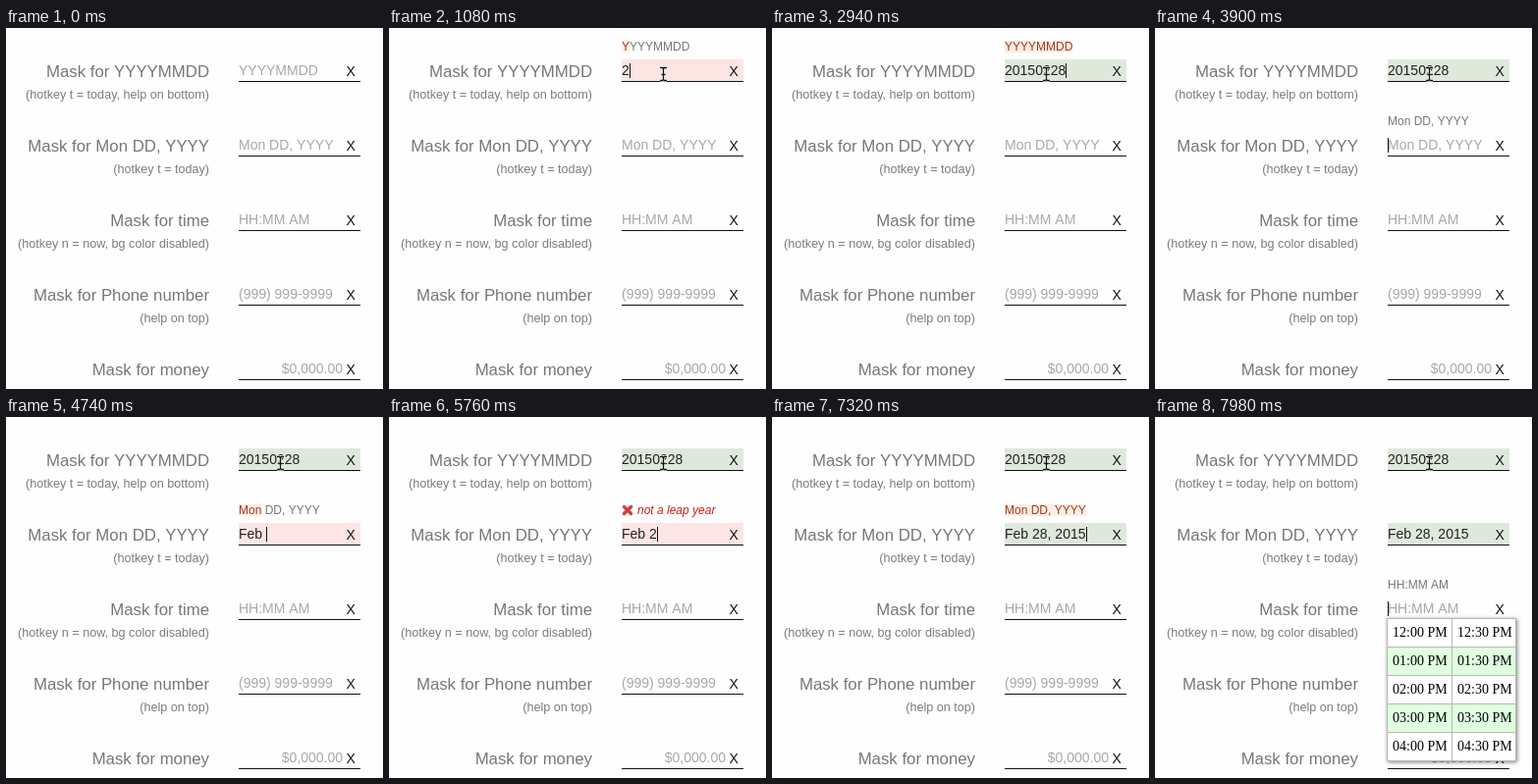
Recreate the animation shown at these times as an HTML page with a canvas. Size 384 by 368 pixels, loop 8 s.

```html
<!DOCTYPE html>
<html>
<head>
<meta charset="utf-8">
<style>
html, body { margin: 0; width: 100%; height: 100%; overflow: hidden; background: #fff; }
canvas { display: block; }
</style>
</head>
<body>
<canvas id="stage" width="384" height="368"></canvas>
<script>
const ctx = document.getElementById('stage').getContext('2d');
const LOOP = 8000, LEFT = 237, PITCH = 76;
const SANS = '"Liberation Sans", Arial, sans-serif';
const SERIF = '"Liberation Serif", "Times New Roman", serif';
const PINK = '#fce5e3', GREEN = '#dfe9db';

const rows = [
  { label: 'Mask for YYYYMMDD', note: '(hotkey t = today, help on bottom)', mask: 'YYYYMMDD' },
  { label: 'Mask for Mon DD, YYYY', note: '(hotkey t = today)', mask: 'Mon DD, YYYY' },
  { label: 'Mask for time', note: '(hotkey n = now, bg color disabled)', mask: 'HH:MM AM' },
  { label: 'Mask for Phone number', note: '(help on top)', mask: '(999) 999-9999' },
  { label: 'Mask for money', note: '', mask: '$0,000.00', right: true }
];

// Each step: start time, focused row, its value, optional error
const steps = [
  [0, -1, ''],
  [120, 0, ''], [1080, 0, '2'], [1260, 0, '20'], [1440, 0, '201'], [1620, 0, '2015'],
  [1800, 0, '20150'], [1920, 0, '201502'], [2580, 0, '2015022'], [2760, 0, '20150228'],
  [3420, 1, ''], [4200, 1, 'F'], [4440, 1, 'Fe'], [4680, 1, 'Feb '], [5040, 1, 'Feb 2'],
  [5760, 1, 'Feb 2', 'not a leap year'],
  [6600, 1, 'Feb 28, '], [6780, 1, 'Feb 28, 2'], [6960, 1, 'Feb 28, 20'],
  [7140, 1, 'Feb 28, 201'], [7320, 1, 'Feb 28, 2015'],
  [7440, 2, '']
];

function rect(x, y, w, h, color) {
  ctx.fillStyle = color;
  ctx.fillRect(x, y, w, h);
}

function text(str, x, y, size, color, align = 'left', family = SANS, style = '') {
  ctx.font = `${style} ${size}px ${family}`;
  ctx.textAlign = align;
  ctx.fillStyle = color;
  ctx.fillText(str, x, y);
  return ctx.measureText(str).width;
}

function stroke(path, width, color) {
  ctx.lineWidth = width;
  ctx.strokeStyle = color;
  ctx.stroke(new Path2D(path));
}

function drawHelp(mask, value, error, y) {
  if (error) {
    ctx.lineCap = 'round';
    const cross = `M239.5 ${y - 3.5}l7 7m0-7l-7 7`;
    stroke(cross, 4, '#e08a88');
    stroke(cross, 2.6, '#cf3a3c');
    ctx.lineCap = 'butt';
    text(error, 253, y + 4, 12, '#d01c1c', 'left', SANS, 'italic');
    return;
  }
  const done = mask.slice(0, value.trimEnd().length);
  ctx.font = `12px ${SANS}`;
  const width = ctx.measureText(done).width;
  if (done) rect(LEFT, y - 6, width, 12, '#fdeee3');
  text(done, LEFT, y + 4, 12, '#a03a20');
  text(mask.slice(done.length), LEFT + width, y + 4, 12, '#777');
}

function drawRow(row, i, [, focus, typed, error]) {
  const y = i * PITCH, focused = i === focus;
  const value = focused ? typed : i < focus ? (i ? 'Feb 28, 2015' : '20150228') : '';
  text(row.label, 207, y + 50, 16.8, '#777', 'right');
  text(row.note, 207, y + 72, 12.6, '#7c7c7c', 'right');
  if (value) rect(LEFT, y + 32, 124, 22, value.length === row.mask.length ? GREEN : PINK);
  rect(LEFT, y + 54, 124, 1, '#111');
  const width = text(value || row.mask, row.right ? 343 : LEFT, y + 48, 14,
    value ? '#222' : '#a8a8a8', row.right ? 'right' : 'left');
  text('X', 346.5, y + 49, 14, '#111');
  if (focused) {
    drawHelp(row.mask, value, error, y + 19);
    rect(LEFT + Math.round(value ? width : 0), y + 36, 1, 15, '#111');
  }
}

function drawTimes() {
  ctx.shadowColor = 'rgba(0,0,0,.5)';
  ctx.shadowBlur = 4;
  ctx.shadowOffsetX = ctx.shadowOffsetY = 1;
  rect(236, 205, 132, 146, '#b8b8b8');
  ctx.shadowColor = 'transparent';
  for (let r = 0; r < 5; r++) {
    for (let c = 0; c < 2; c++) {
      const x = 237 + c * 66, y = 206 + r * 29;
      rect(x, y, c ? 64 : 65, 28, r % 2 ? '#dfffdf' : '#fff');
      const hour = String(r || 12).padStart(2, '0');
      text(`${hour}:${c ? '30' : '00'} PM`, x + 5, y + 18, 14, '#000', 'left', SERIF);
    }
  }
}

function drawPointer() {
  const beam = 'M276 40.5h2.5l1 1l1-1h2.5M279.5 41.5v11M276 53.5h2.5l1-1l1 1h2.5M277.5 47.5h4';
  stroke(beam, 3, 'rgba(255,255,255,.8)');
  stroke(beam, 1.3, '#111');
}

function draw(now) {
  const t = now % LOOP;
  const step = steps.findLast(s => s[0] <= t);
  rect(0, 0, 384, 368, '#fefefe');
  rows.forEach((row, i) => drawRow(row, i, step));
  if (step[1] === 2) drawTimes();
  if (step[1] >= 0) drawPointer();
  requestAnimationFrame(() => draw(performance.now()));
}
draw(0);
</script>
</body>
</html>
```
